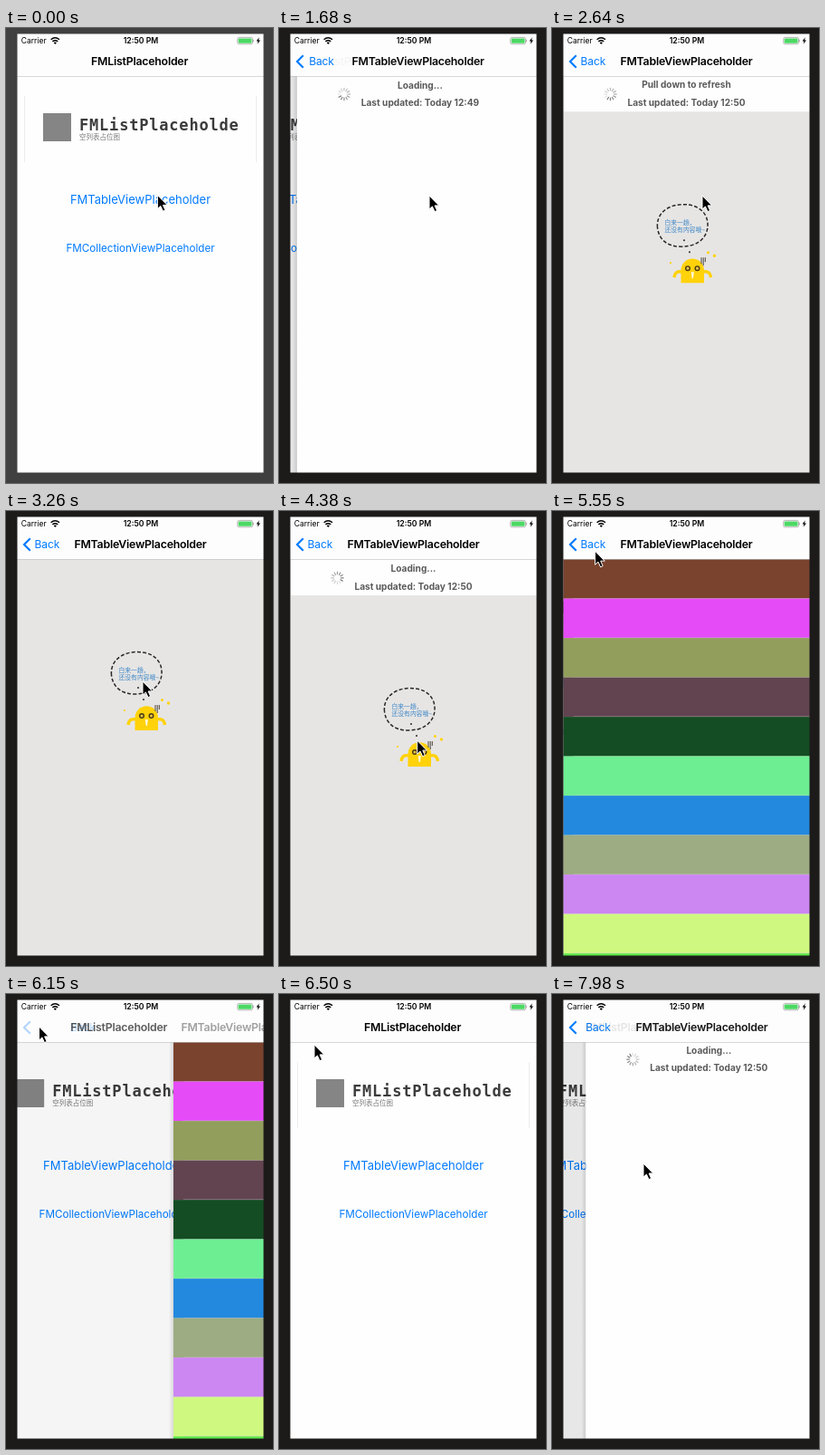
These frames come from a looping animation (295 by 502 pixels, 8 s). An HTML page:

```html
<!DOCTYPE html>
<html lang="en">
<head>
<meta charset="utf-8">
<title>List placeholder demo</title>
<style>
  html, body { margin: 0; width: 100%; height: 100%; overflow: hidden; }
  svg { display: block; width: 100%; height: 100%; font-family: Inter, Roboto, sans-serif; }
  .title { font-size: 12.33px; font-weight: 600; letter-spacing: -.22px; }
  .link { fill: #007aff; }
  .head { font-size: 10.15px; font-weight: 700; fill: #5a5a5a; text-anchor: middle; }
  .mid { text-anchor: middle; }
  .cjk { font-family: "Noto Sans CJK SC", "Noto Sans CJK", sans-serif; }
</style>
</head>
<body>
<svg viewBox="0 0 295 502" preserveAspectRatio="none">
  <defs>
    <linearGradient id="shade">
      <stop offset="0" stop-opacity="0"/>
      <stop offset="1" stop-opacity=".12"/>
    </linearGradient>
  </defs>
  <rect width="295" height="502" fill="#fefefe"/>

  <g id="home">
    <path d="M20.5 75V148M276.5 75V148" stroke="#ececec"/>
    <rect x="41" y="94" width="31" height="31" fill="#858585"/>
    <text x="81" y="113" font-size="17" font-weight="700" letter-spacing=".8" fill="#3c3c3c"
      style="font-family:'DejaVu Sans Mono',monospace">FMListPlaceholde</text>
    <text class="cjk" x="81" y="123.2" font-size="7.5" fill="#777">空列表占位图</text>
    <text class="link mid" x="148.5" y="193.5" font-size="13">FMTableViewPlaceholder</text>
    <text class="link mid" x="148.5" y="247" font-size="11.67">FMCollectionViewPlaceholder</text>
  </g>
  <rect id="dim" x="12" y="53" width="273" height="438"/>

  <g id="panel">
    <rect x="7.5" y="53" width="5" height="438" fill="url(#shade)"/>
    <rect x="12.5" y="53" width="273" height="438" fill="#fefefe"/>
    <g id="header">
      <text id="state" class="head" x="148.5" y="66.5"></text>
      <text id="stamp" class="head" x="148.5" y="86"></text>
      <g id="spinner" stroke="#777" stroke-width="1.2" stroke-linecap="round"></g>
    </g>
    <g id="empty">
      <rect x="12" y="53.1" width="273" height="480" fill="#e6e5e4"/>
      <path d="M116.5 181C115 167 126 156 144 155.5C162 155 173 165 172 180C171 193 160 202 143 202C127 202 118 194 116.5 181Z"
        fill="none" stroke="#2b2627" stroke-width="1.5" stroke-dasharray="4 2.2"/>
      <g class="cjk" font-size="6.8" fill="#3d86c6">
        <text x="124.5" y="177.5">白来一趟，</text>
        <text x="124.5" y="186.3">还没有内容哦~</text>
      </g>
      <g fill="#2b2627">
        <circle cx="146" cy="195" r="1"/>
        <circle cx="152" cy="208" r="1"/>
      </g>
      <g fill="#ffd20a">
        <path d="M142.5 242V228A12.7 12.7 0 0 1 168 228V242Z"/>
        <path d="M144 230Q136 228 135 236M166.5 230Q174.5 228 175.5 236" fill="none" stroke="#ffd20a" stroke-width="3.4"/>
        <circle cx="131" cy="220" r="1.1"/>
        <circle cx="172.5" cy="208.5" r="1.5"/>
        <circle cx="179.5" cy="212" r="1.7"/>
      </g>
      <g fill="#e9c34a" stroke="#4a3a12" stroke-width="1.4">
        <circle cx="150" cy="226" r="2.3"/>
        <circle cx="160.5" cy="226" r="2.3"/>
      </g>
      <path d="M153.8 230H156.8L156 237H154.6Z" fill="#fff8e0"/>
      <path d="M165 214V221M167.2 214V223M169.3 214V219" stroke="#4a4338" stroke-width="1"/>
    </g>
    <g id="rows"></g>
  </g>

  <rect x="12" y="6" width="273" height="47.1" fill="#fdfdfd"/>
  <rect x="12" y="53.1" width="273" height=".5" fill="#b0b0b0"/>
  <path id="chevron" d="M26.8 30.2L20 37L26.8 43.8" fill="none" stroke="#007aff" stroke-width="2.1"/>
  <text id="back" class="link" y="41.3" font-size="12" letter-spacing="-.1">Back</text>
  <text id="homeTitle" class="title" y="41.3">FMListPlaceholder</text>
  <text id="tableTitle" class="title mid" y="41.3">FMTableViewPlaceholder</text>

  <text x="16.8" y="17.2" font-size="8.5">Carrier</text>
  <path d="M49.6 12.8Q54.3 8.6 59 12.8M51.4 14.9Q54.3 12.4 57.2 14.9" fill="none" stroke="#000" stroke-width="1.4"/>
  <path d="M52.7 16.2Q54.3 15 55.9 16.2L54.3 18Z"/>
  <text class="mid" x="149" y="17.2" font-size="8.7" font-weight="600">12:50 PM</text>
  <rect x="255.7" y="10.4" width="16.8" height="7.4" rx="1.8" fill="none" stroke="#999" stroke-width=".7"/>
  <rect x="256.7" y="11.4" width="14.8" height="5.4" rx="1" fill="#4cd964"/>
  <path d="M273.3 12.8V15.4" stroke="#999" stroke-width=".8"/>
  <path d="M279.8 10.3L276.6 14.6H278.5L277.7 17.8L281 13.4H279Z"/>

  <path id="desk" fill-rule="evenodd" d="M0 0H295V502H0ZM12.5 6.5H284.5V490.5H12.5Z"/>
  <path id="cursor" d="M0 0V15L3.4 11.9L6 17.6L8.6 16.4L6.1 10.9H10.7Z" stroke="#fff" stroke-width="1"/>
</svg>

<script>
  const LOOP = 8000, WIDTH = 272, HEAD = 39.2, TOP = 53.1, ROW = 43.5;
  const PUSH = 1270, EMPTY = 2640, PULL = 3830, RELEASE = 4150, FILLED = 5030, POP = 5989, RESET = 7000, PUSH2 = 7680;
  const SLIDE = 500;
  const COLORS = ['#7a432e', '#e54bf7', '#919e5c', '#614450', '#144d23', '#6eee93',
    '#2389de', '#9dac82', '#cc87f3', '#cff880', '#5fe84a'];
  // time, x, y of the pointer tip
  const TRACK = [
    [2960, 166, 185], [3260, 151, 188], [PULL, 151, 188], [RELEASE, 153, 254], [4350, 153, 254],
    [5140, 81, 69], [5750, 36.5, 36], [6180, 36.5, 36], [6500, 39, 56],
    [7130, 100, 186], [7330, 101, 187]
  ];

  const NS = 'http://www.w3.org/2000/svg';
  const el = id => document.getElementById(id);
  const set = (id, attrs) => {
    for (const k in attrs) el(id).setAttribute(k, attrs[k]);
  };
  const add = (parent, tag, attrs) => {
    const node = document.createElementNS(NS, tag);
    for (const k in attrs) node.setAttribute(k, attrs[k]);
    return el(parent).appendChild(node);
  };
  const clamp = v => Math.min(1, Math.max(0, v));
  const smooth = v => { v = clamp(v); return v * v * (3 - 2 * v); };
  const easeOut = v => 1 - (1 - clamp(v)) ** 3;
  const move = (x, y) => `translate(${x} ${y})`;

  // Critically damped spring, cut at the end of the slide: share of the way still to go
  const spring = ms => {
    if (ms >= SLIDE) return 0;
    const x = Math.max(0, ms) * .0133;
    return (1 + x) * Math.exp(-x);
  };

  COLORS.forEach((fill, i) => {
    const y = TOP + i * ROW;
    add('rows', 'rect', { x: 12.5, y, width: WIDTH + 1, height: ROW + .1, fill });
    add('rows', 'rect', { x: 23.5, y: y + ROW - .4, width: WIDTH - 10, height: .4, fill: '#c8c7cc' });
  });
  const spokes = Array.from({ length: 12 }, (_, i) =>
    add('spinner', 'path', { d: 'M0 -4V-6.7', transform: `translate(64.5 73) rotate(${i * 30})` }));

  function away(t) {
    if (t < POP) return spring(t - PUSH);
    if (t < PUSH2) return 1 - spring(t - POP);
    return spring(t - PUSH2);
  }

  function pullOffset(t) {
    if (t < EMPTY) return HEAD * easeOut((t - PUSH + 10) / 420);
    if (t < PULL) return HEAD * (1 - smooth((t - EMPTY) / 400));
    if (t < FILLED) return 40 * smooth((t - PULL) / (RELEASE - PULL));
    if (t < RESET) return HEAD * (1 - smooth((t - FILLED) / 400));
    return HEAD * easeOut((t - PUSH2) / 420);
  }

  function pointer(t) {
    if (t < 870) return [167.4, 184.5];
    if (t < 1050) return [166.7, 185];
    let a = TRACK[0];
    for (const b of TRACK) {
      if (t < b[0]) {
        const k = a === b ? 0 : smooth((t - a[0]) / (b[0] - a[0]));
        return [a[1] + (b[1] - a[1]) * k, a[2] + (b[2] - a[2]) * k];
      }
      a = b;
    }
    return [a[1], a[2]];
  }

  function draw(t) {
    const r = away(t), p = 1 - r, off = pullOffset(t);
    const loading = t < EMPTY || (t >= RELEASE && t < FILLED) || t >= RESET;
    const ended = t < RELEASE ? EMPTY : FILLED;

    set('desk', { fill: t < 1260 ? '#414040' : '#1c1b1a' });
    set('home', { transform: move(-.3 * WIDTH * p, 0) });
    set('dim', { opacity: .1 * p });
    set('panel', { transform: move(WIDTH * r, 0), visibility: r === 1 ? 'hidden' : 'visible' });

    set('header', { transform: move(0, off - HEAD) });
    el('state').textContent = loading ? 'Loading...' : 'Pull down to refresh';
    el('stamp').textContent = 'Last updated: Today 12:' + (t < EMPTY ? 49 : 50);
    set('spinner', { opacity: loading ? 1 : 1 - clamp((t - ended) / 400) });
    const lead = Math.floor(t / 1000 * 12);
    spokes.forEach((s, i) => s.setAttribute('opacity', 1 - .8 * ((lead - i + 1200) % 12) / 11));

    const shift = move(0, off);
    set('empty', { transform: shift, display: t >= EMPTY && t < FILLED ? 'inline' : 'none' });
    set('rows', { transform: shift, display: t >= FILLED && t < RESET ? 'inline' : 'none' });

    const labelX = 31.5 + 62.5 * r;
    set('chevron', { opacity: smooth(p) });
    set('back', { x: labelX, opacity: smooth(p) });
    set('homeTitle', { x: labelX, opacity: r });
    set('tableTitle', { x: 148.5 + 186 * r, opacity: p });
    set('cursor', { transform: move(...pointer(t)) });
  }

  const start = performance.now();
  function tick() {
    draw((performance.now() - start) % LOOP);
    requestAnimationFrame(tick);
  }
  tick();
</script>
</body>
</html>
```
